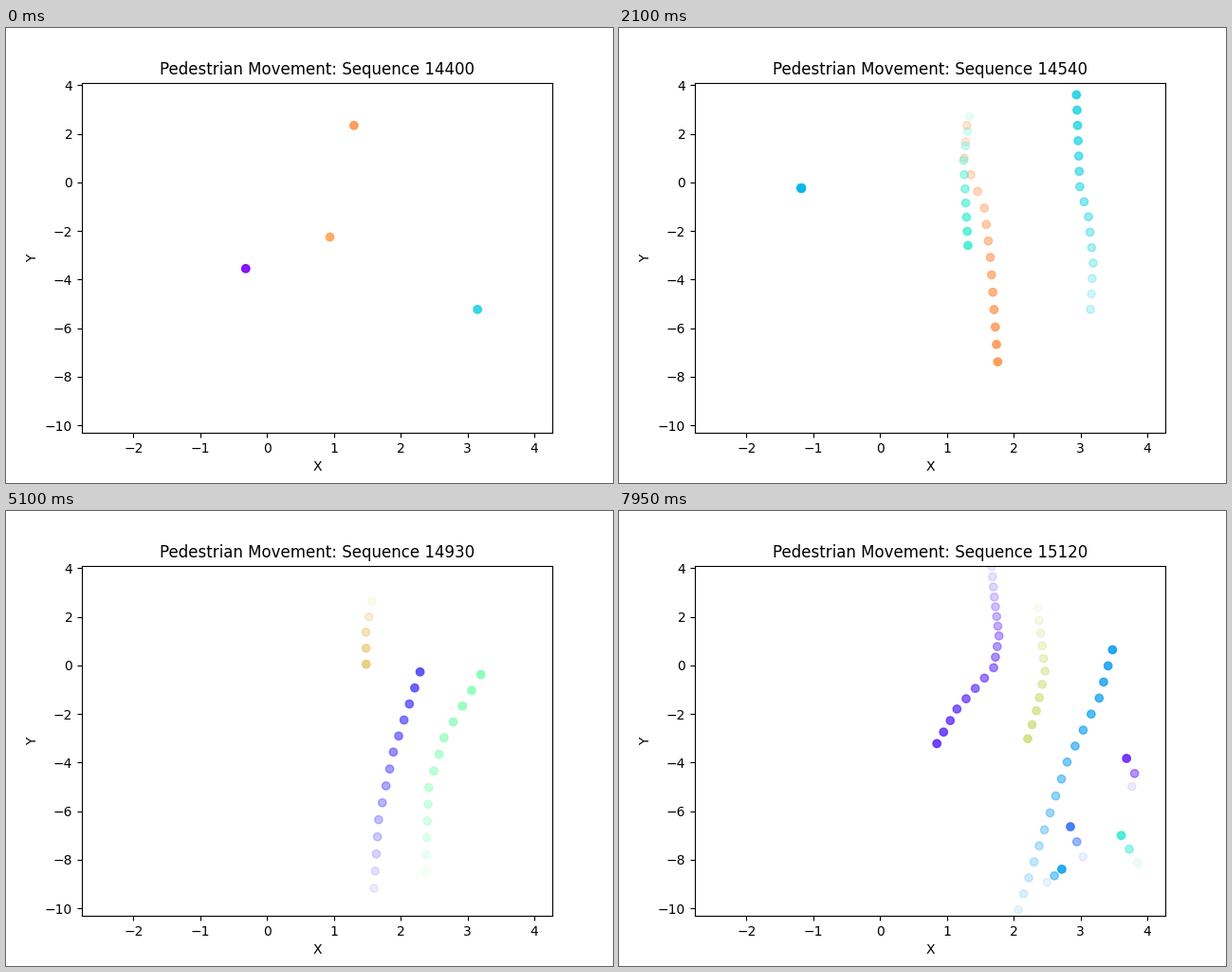
A matplotlib script for the animation above (8 s loop, 640 by 480 pixels).

```python
import numpy as np
import matplotlib.pyplot as plt
from matplotlib.animation import FuncAnimation

TICK_MS, LOOP_MS, TICKS_PER_STEP = 50, 8000, 3
SECOND_SCENE, SKIPPED = 21, 190
FAINT, STRONG = 0.1, 0.9         # opacity of the oldest and newest dot
walkers = []


def walk(shade, *keys):
    """Add a walker with a colormap value and (step, x, y) key points."""
    when, x, y = np.transpose(keys)
    steps = np.arange(when[0], when[-1] + 1)
    path = np.column_stack([np.interp(steps, when, x),
                            np.interp(steps, when, y)])
    walkers.append((int(when[0]), plt.cm.rainbow(shade), path))


# first scene
walk(0.0, (0, -0.32, -3.55), (2, -0.62, -3.4), (6, -1.32, -2.55),
     (8, -1.41, -2.42), (12, -1.41, -2.42))
walk(0.315, (0, 3.15, -5.23), (3, 3.19, -3.32), (6, 3.12, -1.42),
     (8, 2.99, -0.18), (14, 2.94, 3.6))
walk(0.77, (0, 0.94, -2.25), (2, 1.09, -3.5), (4, 0.8, -4.6),
     (8, -0.8, -6.2), (13, -3.2, -8.15))
walk(0.8, (0, 1.3, 2.34), (2, 1.26, 1.0), (5, 1.56, -1.06),
     (8, 1.65, -3.09), (15, 1.78, -8.1))
walk(0.26, (4, -1.18, -0.24), (20, -1.18, -0.24))
walk(0.385, (5, 1.34, 2.7), (8, 1.25, 0.9), (20, 1.38, -6.1))

# second scene
walk(0.09, (21, 1.6, -9.17), (25, 1.67, -6.35), (29, 1.89, -3.57),
     (34, 2.29, -0.27), (39, 2.73, 2.88), (41, 2.85, 4.15))
walk(0.5, (22, 2.37, -8.46), (27, 2.42, -5.03), (30, 2.65, -2.98),
     (34, 3.2, -0.38), (38, 3.4, 2.15), (41, 3.15, 3.9))
walk(0.42, (24, 3.82, -8.1), (25, 3.79, -7.55))
walk(0.7, (30, 1.57, 2.63), (32, 1.48, 1.36), (39, 1.49, -3.24),
     (43, 1.42, -5.85))
walk(0.06, (36, 1.67, 4.06), (39, 1.71, 2.81), (43, 1.78, 1.21),
     (46, 1.7, -0.1), (50, 1.15, -1.8), (53, 0.85, -3.22))
walk(0.215, (37, 2.07, -10.06), (42, 2.46, -6.77), (46, 2.8, -3.98),
     (50, 3.28, -1.35), (53, 3.48, 0.64))
walk(0.66, (43, 2.36, 2.36), (48, 2.47, -0.24), (51, 2.34, -1.87),
     (53, 2.21, -3.02))
walk(0.05, (51, 3.77, -4.99), (52, 3.81, -4.45), (53, 3.69, -3.83))
walk(0.15, (51, 3.04, -7.88), (53, 2.85, -6.64))
walk(0.22, (51, 2.5, -8.93), (53, 2.72, -8.39))
walk(0.37, (51, 3.85, -8.13), (53, 3.61, -7.0))

fig, ax = plt.subplots(figsize=(6.4, 4.8), dpi=100)
ax.set(xlim=(-2.7735, 4.27), ylim=(-10.312, 4.103), xlabel="X", ylabel="Y")
title = ax.set_title("")
dots = ax.scatter([], [])


def draw(tick):
    step = tick // TICKS_PER_STEP
    places, colors = [np.empty((0, 2))], [np.empty((0, 4))]
    for start, color, path in walkers:
        if not start <= step < start + len(path):
            continue
        trail = path[:step - start + 1]
        if start == 0:  # the opening position is recorded twice
            trail = np.vstack([path[:1], trail])
        rgba = np.tile(color, (len(trail), 1))
        rgba[:, 3] = np.linspace(FAINT, STRONG, len(trail))
        places.append(trail)
        colors.append(rgba)
    dots.set_offsets(np.vstack(places))
    dots.set_facecolor(np.vstack(colors))
    dots.set_edgecolor(np.vstack(colors))
    number = 14400 + 10 * step + SKIPPED * (step >= SECOND_SCENE)
    title.set_text(f"Pedestrian Movement: Sequence {number}")
    return dots, title


anim = FuncAnimation(fig, draw, frames=LOOP_MS // TICK_MS, interval=TICK_MS,
                     repeat=True, repeat_delay=0)
plt.show()
```
